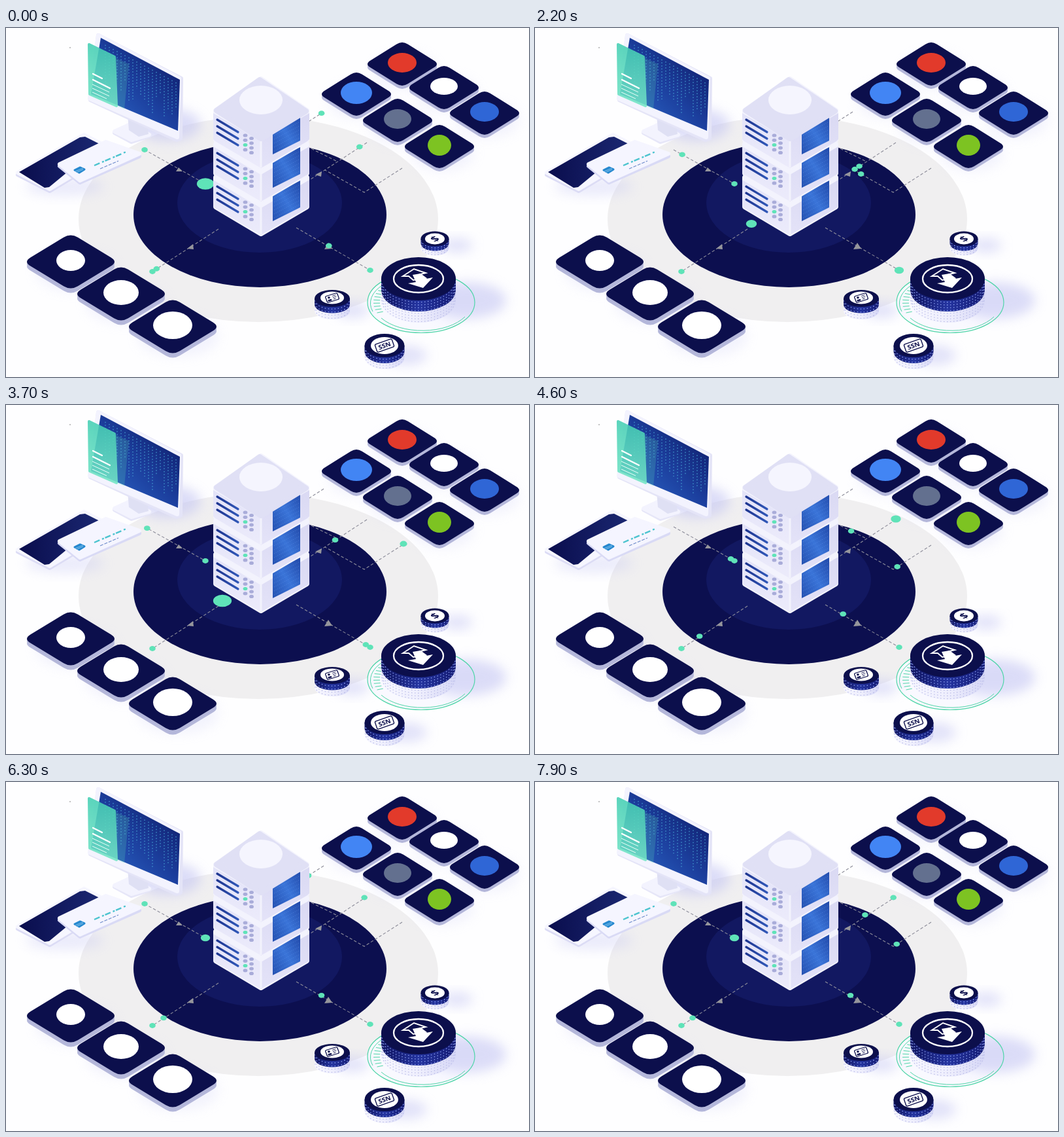
Animation of 800x533 px, one loop 8 s. Source, as an HTML page:

```html
<!DOCTYPE html>
<html lang="en">
<head>
<meta charset="utf-8">
<title>Data flow</title>
<style>
html, body { margin: 0; width: 100%; height: 100%; overflow: hidden; background: #fefeff; }
svg { display: block; width: 100vw; height: 100vh; }
text { font-family: "Open Sans", "Noto Sans", sans-serif; font-weight: 700; text-anchor: middle; }
</style>
</head>
<body>
<svg id="stage" viewBox="0 0 800 533"></svg>
<script>
const NAVY = '#0c0f4c', LILAC = '#b4b7da', MINT = '#5fe3b8', PALE = '#f3f3fe';

const ellipse = (x, y, rx, ry, fill, more = '') =>
  `<ellipse cx="${x}" cy="${y}" rx="${rx}" ry="${ry}" fill="${fill}" ${more}/>`;
const poly = (points, fill, more = '') => `<polygon points="${points}" fill="${fill}" ${more}/>`;
const soft = (points, fill, w = 6) =>
  poly(points, fill, `stroke="${fill}" stroke-width="${w}" stroke-linejoin="round"`);
const path = (d, stroke, w, more = '') =>
  `<path d="${d}" fill="none" stroke="${stroke}" stroke-width="${w}" ${more}/>`;
const gradient = (id, dir, ...colors) => `<linearGradient id="${id}" ${dir}>` +
  colors.map((c, i) => `<stop offset="${i / (colors.length - 1)}" stop-color="${c}"/>`).join('') +
  '</linearGradient>';
const shadow = (x, y, rx, ry, alpha = .5) =>
  ellipse(x, y, rx, ry, '#c5c6f3', `opacity="${alpha}" filter="url(#blur)"`);

// Rhombus with rounded corners that reaches w and h from its centre.
function rhombus(x, y, w, h, fill, cut = .15) {
  const a = w / (1 - cut / 2), b = h / (1 - cut / 2);
  const corners = [[-a, 0], [0, -b], [a, 0], [0, b]];
  const d = corners.map(([cx, cy], i) => {
    const toward = ([px, py]) => `${x + cx + (px - cx) * cut} ${y + cy + (py - cy) * cut}`;
    return `${i ? 'L' : 'M'}${toward(corners[(i + 3) % 4])}Q${x + cx} ${y + cy} ${toward(corners[(i + 1) % 4])}`;
  }).join('');
  return `<path d="${d}z" fill="${fill}"/>`;
}

const tile = (x, y, w, h, depth) =>
  rhombus(x, y + depth, w, h, LILAC) + rhombus(x, y + depth * .5, w, h, LILAC) + rhombus(x, y, w, h, NAVY);

function coin(x, y, rx, ry, h) {
  const wall = (bottom, fill) =>
    `<path d="M${x - rx} ${y}V${bottom}A${rx} ${ry} 0 0 0 ${x + rx} ${bottom}V${y}z" fill="${fill}"/>`;
  let out = wall(y + 2 * h, 'url(#white)') + wall(y + h, 'url(#blue)');
  const rows = Math.max(2, Math.round(h / 4.5));
  for (let i = 0; i < 2 * rows; i++) {
    const level = y + (i + .65) * h / rows;
    out += path(`M${x - rx + 1} ${level}A${rx - 1} ${ry} 0 0 0 ${x + rx - 1} ${level}`,
      i < rows ? '#8fa2f0' : '#b9bbe8', 1.3, 'stroke-dasharray="1.4 3.6"');
  }
  return out + ellipse(x, y, rx, ry, NAVY);
}

function ground() {
  const arrows = ['260,219 264,213 270,219', '277,337 286,330 287,338',
    '487,338 493,328 499,337', '473,224 483,219 482,227'];
  return ellipse(386, 292, 275, 157, '#f0eff0') + ellipse(388.5, 285, 193.5, 111, '#0c0f4f') +
    ellipse(388, 267, 126, 76, '#121861') +
    path('M212 186L305 238M325 307L224 372M444 305L557 370M552 175L466 231' +
      'M486 128L428 165L507 204M606 214L548 251L488 217', '#8c8c99', 1.1, 'stroke-dasharray="4.5 3"') +
    arrows.map(p => poly(p, '#96969c')).join('');
}

function server() {
  let out = '';
  for (let i = 2; i >= 0; i--) {
    const y = 126 + 51 * i;
    out += soft(`321,${y} 390,${y - 48} 460,${y} 460,${y + 45} 390,${y + 86} 321,${y + 45}`, '#f3f3fd', 8) +
      poly(`317,${y + 4} 390,${y + 47} 390,${y + 88} 320,${y + 47} 317,${y + 44}`, 'url(#left)') +
      poly(`464,${y + 4} 390,${y + 47} 390,${y + 88} 461,${y + 47} 464,${y + 44}`, 'url(#right)') +
      path(`M390 ${y + 46}V${y + 87}`, '#f2f2fc', 3);
    for (let k = 0; k < 3; k++)
      out += path(`M323 ${y + 14 + 10 * k}L355 ${y + 33 + 10 * k}`, 'url(#bar)', 3.2, 'stroke-linecap="round"');
    for (let k = 0; k < 8; k++) {
      const bx = 366 + 9.5 * (k % 2), by = y + 38 + 7.3 * (k >> 1) + 4.5 * (k % 2);
      out += ellipse(bx, by, 3.4, 2.6, k === 4 ? MINT : '#a9acd9');
    }
    out += poly(`408,${y + 26} 450,${y + 5} 450,${y + 46} 408,${y + 67}`, 'url(#panel)');
    for (let k = 0; k < 6; k++)
      out += path(`M410 ${y + 32 + 6 * k}L448 ${y + 12 + 6 * k}`, '#6b9ff2', .7,
        'stroke-dasharray="1 2" opacity=".7"');
  }
  return out + soft('322,126 388,79 459,127 390,169', '#e0e0f5', 8) + ellipse(390, 110, 33, 22, '#f5f5fe');
}

function monitor() {
  let seed = 7, out = shadow(248, 148, 50, 25, .6) +
    soft('166,160 190,149 219,165 192,174', '#e6e6f8') + soft('166,158 190,147 219,163 192,171', PALE) +
    poly('186,132 216,146 218,162 203,166 188,156', '#dfe0f4') +
    soft('141,11 268,77 267,169 261,171 129,110', '#e4e4f7') + soft('141,11 265,77 262,167 128,108', PALE) +
    poly('145,15 266,79 263,157 130,101', 'url(#screen)');
  for (let x = 152; x < 262; x += 6) {
    seed = seed * 137 % 251;
    const top = 19 + (x - 145) * .53;
    out += path(`M${x} ${top + 3}V${top + 30 + seed / 251 * 42}`, '#4aa9d8', 1.4,
      'stroke-dasharray="1.5 3.1" opacity=".8"');
  }
  out += poly('168,46 188,55 181,124 169,119', MINT, 'opacity=".2"') +
    `<g opacity=".88">${soft('127,25 166,44 169,119 128,101', 'url(#card)', 4)}</g>` +
    path('M133 70l14 7m-14 2l26 13', '#fff', 2.3, 'stroke-linecap="round"') +
    path('M132 86l26 12m-26 -6l26 12m-26 -6l22 10', '#e9fff8', 1);
  return out + ellipse(98, 30, .8, .8, '#777');
}

function phoneAndCard() {
  return shadow(90, 242, 60, 14, .35) +
    soft('18,224 119,166 166,190 67,249', '#dcdcf5') + soft('18,221 119,163 166,187 67,246', '#f6f6ff') +
    poly('20,220 113,167 121,166 145,178 66,243 59,244', 'url(#phone)') +
    soft('82,211 153,177 204,196 113,236', '#d9daf5') + soft('82,208 153,174 204,192 113,233', '#f5f5ff') +
    soft('105,217 113,213 120,216 112,221', '#2688cf', 3) +
    path('M106 219l12 -5m-9 6l9 -4', '#9bd2f4', .8) +
    path('M135 210L184 189', '#4dc4cf', 2.4, 'stroke-dasharray="9 4 3 2"') +
    path('M144 215L172 203', '#6d8ac9', 1.2, 'stroke-dasharray="5 2"');
}

function tiles() {
  const left = [[99, 357, 22, 16], [176, 406, 27, 19], [255, 456, 30, 21]];
  const right = [[606, 55, 22, 15, '#e23a2b'], [536, 101, 24, 17, '#4285f4'], [670, 91, 21, 13, '#fff'],
    [599, 141, 21, 15, '#63708f'], [732, 130, 22, 15, '#2f66d6'], [663, 181, 18, 16, '#7dc322']];
  let out = '';
  for (const [x, y, rx, ry] of left)
    out += shadow(x + 8, y + 14, 62, 32, .2) + tile(x, y, 67, 40.5, 7) + ellipse(x, y - 2, rx, ry, '#fff');
  for (const [x, y, rx, ry, fill] of right)
    out += shadow(x + 5, y + 10, 48, 28, .2) + tile(x, y, 53, 33, 5) + ellipse(x, y - 2, rx, ry, fill);
  return out;
}

function coins() {
  let out = ellipse(635, 419, 82, 46.5, '#f9f9ff') +
    shadow(690, 332, 24, 11, .5) + shadow(705, 416, 60, 28, .6) +
    shadow(530, 431, 25, 12, .5) + shadow(612, 500, 32, 15, .5) +
    ellipse(635, 419, 82, 46.5, 'none', 'stroke="#4fd5a8" stroke-width="1.2"') +
    path('M561 433A75 42 0 0 1 577 392M574 443A75 42 0 0 0 702 441', '#4fd5a8', 1);
  for (let a = 2.75; a < 3.75; a += .12) {
    const c = Math.cos(a), s = Math.sin(a);
    out += path(`M${635 + 73 * c} ${419 + 42 * s}L${635 + 63 * c} ${419 + 37 * s}`, '#4fd5a8', 1);
  }
  out += coin(631, 383, 57, 33, 17) +
    ellipse(631, 383, 38, 21, 'none', 'stroke="#fff" stroke-width="2.3"') +
    poly('607,379 624,368 642,374 634,376 642,382 623,385 616,379', NAVY, 'stroke="#fff" stroke-width="2"') +
    poly('622,377 634,375 643,383 653,381 638,397 615,390 627,388', '#fff') +
    coin(656, 322, 21.5, 11.5, 7) + ellipse(656, 322, 15, 8.5, '#fff') +
    `<text transform="matrix(.87 -.45 .7 .5 656 322)" y="6" font-size="17" fill="${NAVY}">$</text>` +
    coin(499, 413, 27, 13, 9.5) + ellipse(499, 412, 18, 9.5, '#fff') +
    `<g transform="matrix(.9 -.28 .3 .8 499 412)" fill="none" stroke="${NAVY}">
      <rect x="-10" y="-6" width="20" height="12" rx="2" stroke-width="1.4"/>
      <path d="M1 -3h6m-6 3h6m-6 3h4"/><circle cx="-5" cy="-2" r="1.4" fill="${NAVY}"/>
      <path d="M-8 3h6" stroke-width="3"/></g>` +
    coin(579, 485, 30.5, 18, 9) + ellipse(579, 485, 21, 13, '#fff') +
    `<g transform="matrix(.92 -.32 .3 .85 579 485)" fill="${NAVY}">
      <rect x="-14" y="-7" width="28" height="14" rx="2" fill="none" stroke="${NAVY}" stroke-width="1.4"/>
      <text y="3.8" font-size="10.5">SSN</text></g>`;
  return out;
}

const down = 'x1="0" y1="0" x2="0" y2="1"', across = 'x1="0" y1="0" x2="1" y2="0"',
  diagonal = 'x1="0" y1="1" x2="1" y2="0"';
stage.innerHTML = `<defs>
  <filter id="blur" x="-50%" y="-50%" width="200%" height="200%"><feGaussianBlur stdDeviation="9"/></filter>
  ${gradient('left', down, '#e3e3f8', '#ecebfb')}${gradient('right', down, '#dad9f3', '#e4e3f8')}
  ${gradient('bar', across, '#1d3590', '#3158b8')}
  ${gradient('panel', diagonal, '#2450b0', '#3a74d8', '#2148a8')}
  ${gradient('screen', diagonal, '#2f6fd0', '#1c3f9e', '#0b125a')}
  ${gradient('phone', across, '#0a0d4d', '#1b2872')}
  ${gradient('card', down, '#45cfb4', '#74e6c6')}
  ${gradient('white', across, '#f6f6ff', '#efeffd', '#d6d7f6')}
  ${gradient('blue', across, '#10145f', '#2434a0', '#141a72')}</defs>` +
  ground() + '<g id="dots"></g>' + server() + monitor() + phoneAndCard() + tiles() + coins();

// Each track: corner points, cycle length, departure time and travel time in ms.
const tracks = [
  { points: [[212, 186], [305, 238]], cycle: 1600, start: 460, travel: 1000, end: true, wait: 570 },
  { points: [[331, 299], [224, 372]], cycle: 1600, start: 660, travel: 1000, end: true },
  { points: [[444, 303], [557, 370]], cycle: 1600, start: 1160, travel: 1000, end: true },
  { points: [[552, 174], [466, 231]], cycle: 1600, start: 1450, travel: 1155 },
  { points: [[486, 128], [428, 165], [507, 204], [466, 231]], cycle: 3000, start: -50, travel: 2600 },
  { points: [[608, 212], [548, 251], [488, 217], [466, 231]], cycle: 3285, start: 430, travel: 2300 }
];

function along(points, part) {
  const lengths = points.slice(1).map((p, i) => Math.hypot(p[0] - points[i][0], p[1] - points[i][1]));
  let left = part * lengths.reduce((a, b) => a + b), i = 0;
  while (i < lengths.length - 1 && left > lengths[i]) left -= lengths[i++];
  const k = left / lengths[i], [a, b] = [points[i], points[i + 1]];
  return [a[0] + (b[0] - a[0]) * k, a[1] + (b[1] - a[1]) * k];
}

const REST = 4.8;
const dot = ([x, y], r) => ellipse(x, y, r, r * .57 + 1.2, MINT);
const swell = before => before > 170 ? 15 * (400 - before) / 230 : REST + 10 * before / 170;
const settle = after => after < 170 ? REST + 10 * after / 170 : Math.max(REST, 15 - 10 * (after - 170) / 230);

function drawTrack({ points, cycle, start, travel, end, wait = 400 }, t) {
  const age = ((t - start) % cycle + cycle) % cycle, before = cycle - age;
  let out = '';
  if (end) out += dot(points[points.length - 1], age > travel ? settle(age - travel) : REST);
  if (age < travel) out += dot(along(points, age / travel), REST);
  if (before < wait) out += dot(points[0], wait > 400 ? Math.max(REST, swell(before)) : swell(before));
  return out;
}

const dots = document.getElementById('dots');
const origin = performance.now();
function frame() {
  const t = (performance.now() - origin) % 8000;
  dots.innerHTML = tracks.map(track => drawTrack(track, t)).join('');
  requestAnimationFrame(frame);
}
frame();
</script>
</body>
</html>
```
